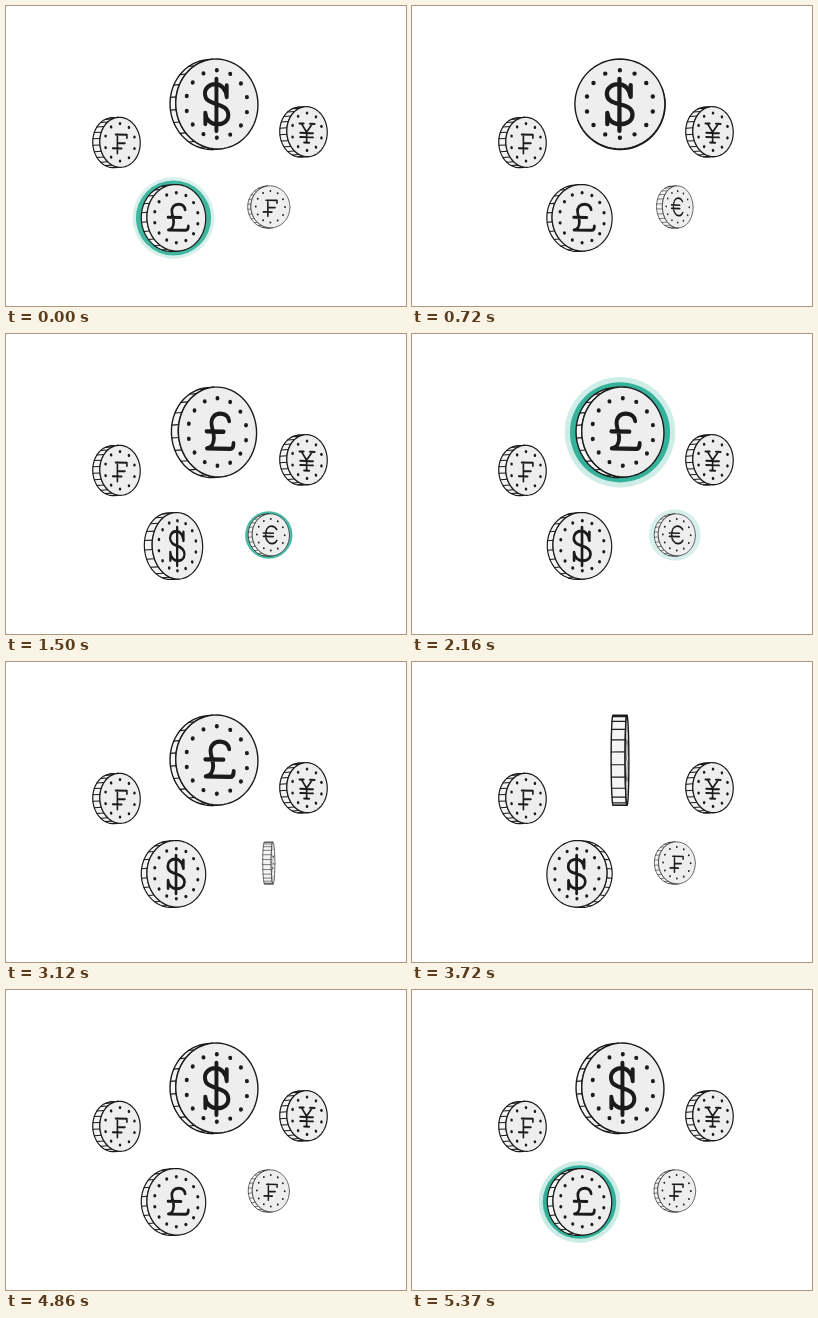
These frames come from a looping animation (400 by 300 pixels, 5400 ms). An HTML page with a canvas:

```html
<!DOCTYPE html>
<html lang="en">
<head>
<meta charset="utf-8">
<title>Spinning coins</title>
<style>
html, body { margin: 0; width: 100%; height: 100%; overflow: hidden; background: #fff; }
canvas { display: block; width: 400px; height: 300px; }
</style>
</head>
<body>
<canvas id="stage"></canvas>
<script>
const LOOP = 5400, FLIP = 1200, PULSE = 550, PULSE_GAP = 330;
const INK = '#1b1b1b', FACE = '#eeeeee', RIM = '#f4f4f4', TEAL = '#12a488';
const TILT = 2.5 * Math.PI / 180;

// Symbols on a face of radius 100
const symbols = {
  dollar: 'M24-16C22-34 10-44-3-44C-18-44-29-35-29-23C-29-8-16-4-2 0C14 4 28 9 28 24C28 37 16 45 0 45C-14 45-27 36-28 20M24-42V-16M-28 20V45M-1-56V60',
  pound: 'M30-25C28-36 20-41 8-41C-8-41-17-30-15-17C-14-6-9 2-9 13C-9 26-16 36-27 37H32C38 37 41 32 41 24M-28-1H16',
  franc: 'M-13-31V45M-22-31H34V-18M-13 3H24M-36 25H8',
  yen: 'M-28-32L-2 2L26-32M-38-32H-16M14-32H38M-2 2V44M-34 5H30M-34 22H30M-15 44H11',
  euro: 'M32-26C24-38 14-42 4-42C-18-42-28-22-28 0C-28 24-14 42 6 42C18 42 28 36 33 26M-40-8H14M-40 8H14'
};
for (const name in symbols) symbols[name] = new Path2D(symbols[name]);

// flips[i] turns faces[i] into the other face; pulses start the teal rings
const coins = [
  { x: 208, y: 98.3, r: 45, thick: 14, rest: 24, line: 1.4, pen: 9.5, dots: 14, dot: 4.9,
    notches: 22, soft: 0.5, faces: ['dollar', 'pound'], flips: [570, 3270], pulses: [1720] },
  { x: 167.5, y: 212, r: 33.3, thick: 12, rest: 28, line: 1.2, pen: 9, dots: 14, dot: 5.2,
    notches: 22, soft: 0.3, faces: ['pound', 'dollar'], flips: [690, 3480], pulses: [4940] },
  { x: 262.8, y: 201, r: 21, thick: 8.5, rest: 28, line: 0.65, pen: 8, dots: 12, dot: 4.8,
    notches: 26, soft: 0, faces: ['franc', 'euro'], flips: [5340, 2640], pulses: [1370, 3980] },
  { x: 110.5, y: 136.5, r: 25, thick: 12, rest: 36, line: 1.2, pen: 8, dots: 10, dot: 6.3,
    notches: 24, soft: 0, faces: ['franc'], flips: [], pulses: [] },
  { x: 297.5, y: 125.9, r: 25, thick: 12, rest: 36, line: 1.2, pen: 8, dots: 10, dot: 6.3,
    notches: 24, soft: 0, faces: ['yen'], flips: [], pulses: [] }
];

const canvas = document.getElementById('stage');
const ctx = canvas.getContext('2d');
const dpr = window.devicePixelRatio || 1;
canvas.width = 400 * dpr;
canvas.height = 300 * dpr;

const since = (t, start) => (t - start + LOOP) % LOOP;

// cubic-bezier(.25, .1, .25, 1)
function ease(x) {
  if (x >= 1) return 1;
  const curve = (s, a, b) => 3 * s * (1 - s) ** 2 * a + 3 * s * s * (1 - s) * b + s ** 3;
  let lo = 0, hi = 1;
  for (let i = 0; i < 24; i++) {
    const mid = (lo + hi) / 2;
    if (curve(mid, 0.25, 0.25) < x) lo = mid; else hi = mid;
  }
  return curve(lo, 0.1, 1);
}

function pose(coin, t) {
  if (!coin.flips.length) return { angle: coin.rest, face: coin.faces[0] };
  const ages = coin.flips.map(start => since(t, start));
  const from = ages[0] < ages[1] ? 0 : 1;
  const angle = coin.rest - 180 * ease(ages[from] / FLIP);
  return angle > -90
    ? { angle, face: coin.faces[from] }
    : { angle: angle + 180, face: coin.faces[1 - from] };
}

function drawRings(coin, t) {
  for (const start of coin.pulses) {
    for (const delay of [0, PULSE_GAP]) {
      const u = since(t, start + delay) / PULSE;
      if (u >= 1) continue;
      ctx.globalAlpha = 1 - u;
      ctx.fillStyle = TEAL;
      ctx.beginPath();
      ctx.arc(coin.x, coin.y, coin.r * (1.23 - 0.23 * (1 - u) ** 3), 0, 2 * Math.PI);
      ctx.fill();
    }
  }
  ctx.globalAlpha = 1;
}

function drawCoin(coin, t) {
  const { angle, face } = pose(coin, t);
  const a = angle * Math.PI / 180;
  const sin = Math.sin(a), cos = Math.cos(a);
  const st = Math.sin(TILT), ct = Math.cos(TILT);
  const dx = sin * coin.thick / 2, dy = -cos * st * coin.thick / 2;

  // Point on the edge: side 1 is the front, -1 the back
  const edge = (phi, side) => [
    coin.x + side * dx + coin.r * Math.cos(phi) * cos,
    coin.y + side * dy + coin.r * (Math.cos(phi) * sin * st + Math.sin(phi) * ct)
  ];

  ctx.filter = coin.soft ? `blur(${coin.soft * dpr}px)` : 'none';
  ctx.lineWidth = coin.line;
  ctx.strokeStyle = INK;
  ctx.lineJoin = ctx.lineCap = 'round';

  // Visible half of the rim
  const first = Math.atan2(st, -sin * ct) - Math.PI / 2;
  const steps = 48;
  ctx.beginPath();
  for (let i = 0; i <= steps; i++) ctx.lineTo(...edge(first + Math.PI * i / steps, 1));
  for (let i = steps; i >= 0; i--) ctx.lineTo(...edge(first + Math.PI * i / steps, -1));
  ctx.closePath();
  ctx.fillStyle = RIM;
  ctx.fill();
  ctx.stroke();

  ctx.beginPath();
  for (let i = 0; i < coin.notches; i++) {
    const phi = (i + 0.5) * 2 * Math.PI / coin.notches;
    if (Math.sin(phi - first) <= 0) continue;
    ctx.moveTo(...edge(phi, 1));
    ctx.lineTo(...edge(phi, -1));
  }
  ctx.lineWidth = coin.line * 0.85;
  ctx.stroke();

  // Front face
  ctx.beginPath();
  for (let i = 0; i < 72; i++) ctx.lineTo(...edge(i * Math.PI / 36, 1));
  ctx.closePath();
  ctx.fillStyle = FACE;
  ctx.fill();
  ctx.lineWidth = coin.line;
  ctx.stroke();

  const k = coin.r / 100;
  ctx.save();
  ctx.transform(k * cos, k * sin * st, 0, k * ct, coin.x + dx, coin.y + dy);
  ctx.fillStyle = INK;
  for (let i = 0; i < coin.dots; i++) {
    const phi = i * 2 * Math.PI / coin.dots - Math.PI / 2;
    ctx.beginPath();
    ctx.arc(75 * Math.cos(phi), 75 * Math.sin(phi), coin.dot, 0, 2 * Math.PI);
    ctx.fill();
  }
  ctx.lineWidth = coin.pen;
  ctx.stroke(symbols[face]);
  ctx.restore();
  ctx.filter = 'none';
}

function draw(t) {
  ctx.setTransform(dpr, 0, 0, dpr, 0, 0);
  ctx.fillStyle = '#fff';
  ctx.fillRect(0, 0, 400, 300);
  for (const coin of coins) {
    drawRings(coin, t);
    drawCoin(coin, t);
  }
}

const begin = performance.now();
function tick() {
  draw((performance.now() - begin) % LOOP);
  requestAnimationFrame(tick);
}
tick();
</script>
</body>
</html>
```
